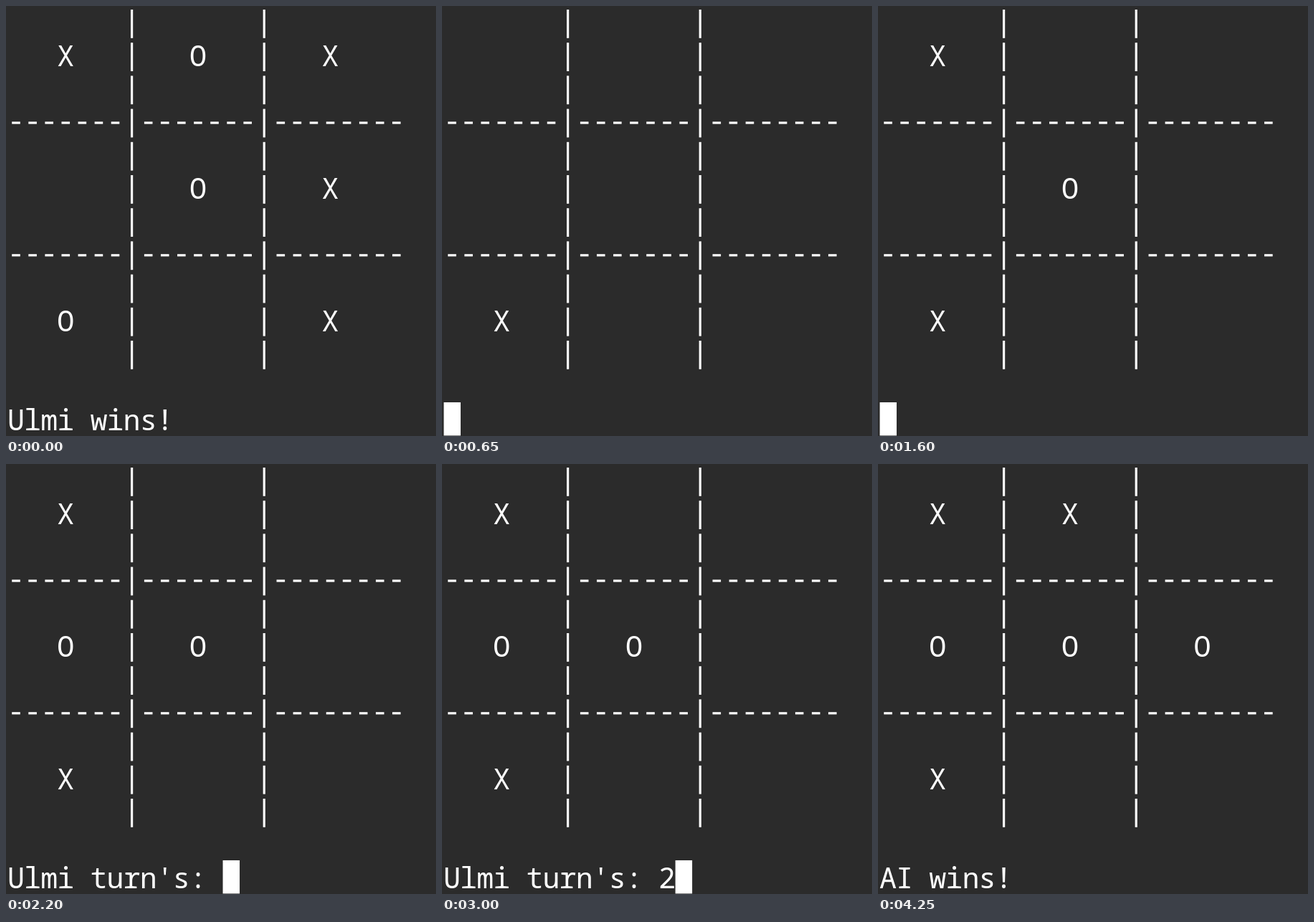
Animation of 600x600 px, one loop 4.35 s. Source, as an HTML page:

```html
<!DOCTYPE html>
<html lang="en">
<head>
<meta charset="utf-8">
<title>Tic-tac-toe terminal</title>
<style>
  html, body { margin: 0; width: 100%; height: 100%; overflow: hidden; background: #2b2b2b; }
  svg { display: block; width: 100vw; height: 100vh; }
  text { font: 40px "Noto Sans Mono", "DejaVu Sans Mono", monospace; text-anchor: middle; fill: #fff; }
</style>
</head>
<body>
<svg id="stage" viewBox="0 0 600 600">
  <rect width="600" height="600" fill="#2b2b2b"/>
</svg>
<script>
const LOOP = 4350, BLINK = 300;
const COL = 23.08, ROW = 46.2, LEFT = 2.5;
const stage = document.getElementById('stage');

const centre = col => LEFT + (col + 0.5) * COL;
const baseline = row => 37.8 + row * ROW;

function add(tag, attrs) {
  const el = document.createElementNS('http://www.w3.org/2000/svg', tag);
  for (const key in attrs) el.setAttribute(key, attrs[key]);
  return stage.appendChild(el);
}

const box = (x, y, width, height) => add('rect', { x, y, width, height, fill: '#fff' });

// Board made of terminal characters: bars in two columns, dashes in two rows
for (const col of [7, 15]) {
  for (let row = 0; row < 11; row++) box(centre(col) - 1.6, 5 + row * ROW, 3.2, 39.8);
}
for (const row of [3, 7]) {
  for (let col = 0; col < 24; col++) {
    if (col % 8 !== 7 || col === 23) box(centre(col) - 5.8, baseline(row) - 15, 11.6, 3.2);
  }
}

const cells = Array.from({ length: 9 }, (_, i) =>
  add('text', { x: centre(3 + 8 * (i % 3)), y: baseline(1 + 4 * Math.floor(i / 3)) }));
const line = add('text', {
  x: Array.from({ length: 24 }, (_, col) => centre(col).toFixed(2)).join(' '),
  y: baseline(12)
});
const caret = box(LEFT, 553, COL + 0.4, 46.4);

// caret: column, or -1 when it is below the view; key: last key press, restarts the blink
const PLAYER = 'Ulmi', PROMPT = PLAYER + " turn's:";
const scenes = [
  { at: 0,    marks: 'XOX OXO X', text: PLAYER + ' wins!', caret: -1, key: 0 },
  { at: 600,  marks: '      X  ', text: '', caret: 0, key: 600 },
  { at: 800,  marks: '    O X  ', text: PROMPT, caret: 13, key: 600 },
  { at: 1400, marks: '    O X  ', text: PROMPT + ' 1', caret: 14, key: 1400 },
  { at: 1550, marks: 'X   O X  ', text: '', caret: 0, key: 1550 },
  { at: 1750, marks: 'X  OO X  ', text: PROMPT, caret: 13, key: 1550 },
  { at: 2800, marks: 'X  OO X  ', text: PROMPT + ' 2', caret: 14, key: 2800 },
  { at: 3050, marks: 'XX OO X  ', text: '', caret: 0, key: 3050 },
  { at: 3250, marks: 'XX OOOX  ', text: 'AI wins!', caret: -1, key: 3050 }
];

let shown = null;

function render(time) {
  const scene = scenes.filter(s => s.at <= time).pop();
  if (scene !== shown) {
    cells.forEach((cell, i) => { cell.textContent = scene.marks[i].trim(); });
    line.textContent = scene.text;
    caret.setAttribute('x', LEFT + scene.caret * COL);
    shown = scene;
  }
  const lit = Math.floor((time - scene.key) / BLINK) % 2 === 0;
  caret.setAttribute('visibility', scene.caret >= 0 && lit ? 'visible' : 'hidden');
}

const start = performance.now();
function tick() {
  render((performance.now() - start) % LOOP);
  requestAnimationFrame(tick);
}
tick();
</script>
</body>
</html>
```
